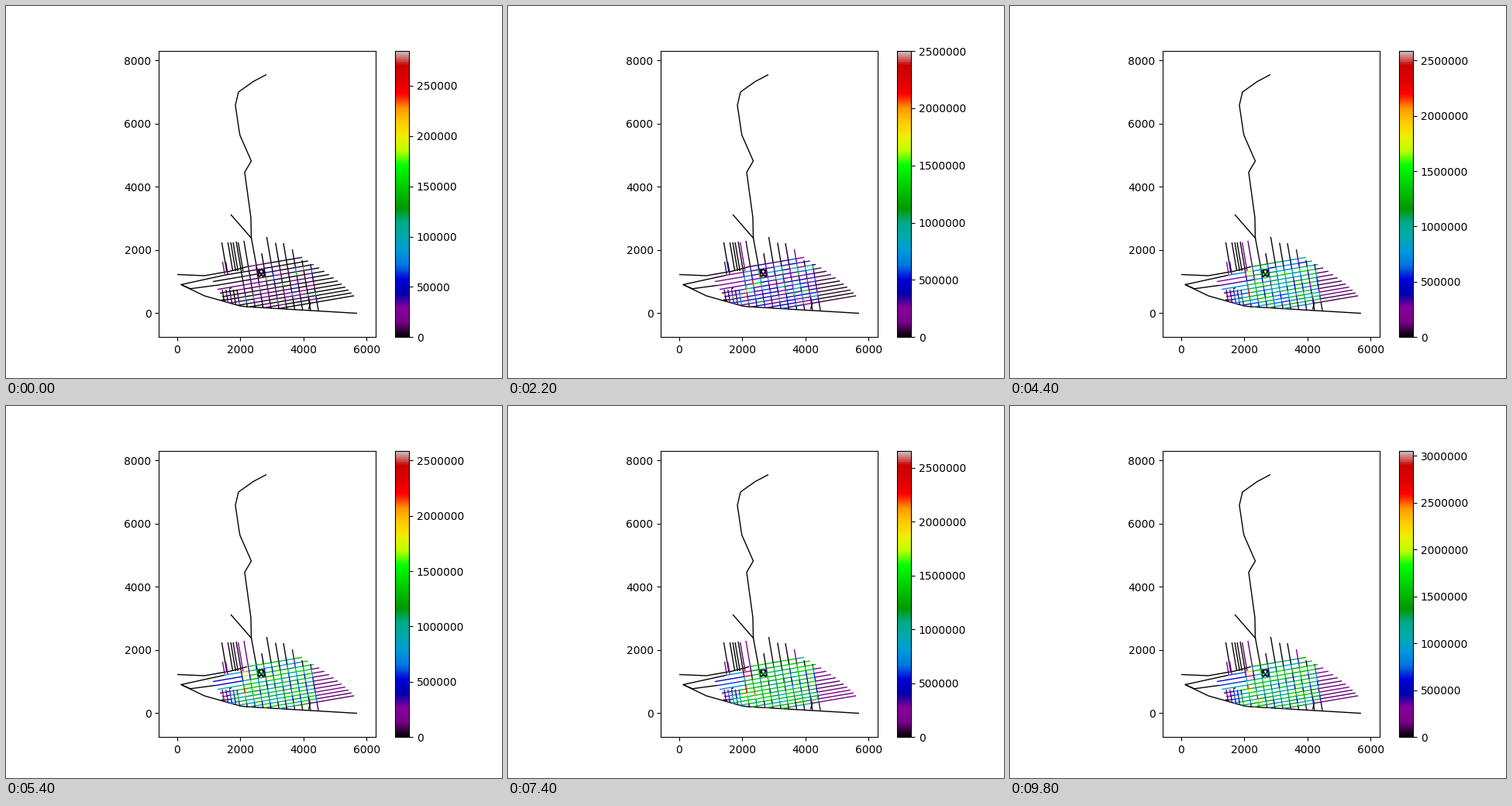
These frames come from a looping animation (640 px wide and 480 px high, 10000 ms). A matplotlib script:

```python
import numpy as np
import matplotlib.pyplot as plt
from matplotlib.animation import FuncAnimation
from matplotlib.collections import LineCollection

FRAMES, STEP_MS = 50, 200
SLOPE = 0.17
rng = np.random.default_rng(12)


def metres(pts):
    """Map plan units (y down) to metres."""
    x, y = np.asarray(pts, float).T
    return np.column_stack([(x - 220.6) / 0.0408, (396.4 - y) / 0.0408])


def shore(x):
    return np.interp(x, [256, 302, 310, 453], [374, 387, 388, 396.5])


def row_point(c, x):
    return x, c - SLOPE * (x - 340)


def col_point(k, y):
    return k + SLOPE * (y - 360), y


def crossing(c, k):
    y = (c - SLOPE * (k - 340 - SLOPE * 360)) / (1 + SLOPE ** 2)
    return col_point(k, y)


def pieces(a, b, cuts):
    stops = [a] + sorted(s for s in cuts if a + 1 < s < b - 1) + [b]
    return zip(stops[:-1], stops[1:])


# Roads that stay empty
t = np.linspace(0, 2 * np.pi, 40)
knot = np.column_stack([329.5 + 4 * np.sin(3 * t), 344.5 + 4.5 * np.sin(4 * t + 0.6)])
roads = [
    [(336, 88.5), (319, 97.5), (300, 111), (296, 128), (301, 162), (302, 167),
     (316.5, 200), (308, 214.5), (316, 273), (316.5, 299), (325, 345)],
    [(290, 269), (317, 300)],
    [(221, 346.5), (256, 348), (290, 342), (311, 336.4)],
    [(282, 347.3), (226, 359.5), (256, 374), (302, 387), (310, 388), (453, 396.5)],
    [(226, 359.5), (238, 364.8), (270, 360.5)],
    [(278, 379), (284, 379.5)],
    [(288, 365), (291, 363.5)],
    [(389, 370), (392.5, 384), (390.5, 391.5)],
    knot,
]

# Cross streets: offset at x=340, west end, east end
rows = []
for i in range(13):
    c = 331.5 + 6 * i - 0.077 * i ** 2
    west = 311 - 29 * i if i < 2 else 261 + 3 * i
    while row_point(c, west)[1] > shore(west):
        west += 0.5
    rows.append((c, west, 382 + 8 * i - 0.2 * i ** 2))

# Avenues: offset at y=360, top end, bottom end
AVENUES = 306.6 + 10.1 * np.arange(10)
tops = [304, 303, 336, 319, 298, 305.5, 306, 314, 328, 333]
cols = [(k, top, shore(k + 5) + 0.5) for k, top in zip(AVENUES, tops)]
cols += [(k, 305, 342) for k in (287.8, 295.7, 299.4, 302.4, 309)]
cols += [(k, 330, 346) for k in (284.6, 288.6)]
cols += [(k, 366, shore(k + 4) + 0.5) for k in np.linspace(278, 297, 5)]

segments, upright, offsets = [], [], []


def add_street(point, offset, a, b, cuts, up):
    for lo, hi in pieces(a, b, cuts):
        segments.append([point(offset, lo), point(offset, hi)])
        upright.append(up)
        offsets.append(offset)


for c, west, east in rows:
    cuts = [crossing(c, k)[0] for k, top, end in cols
            if top - 1 < crossing(c, k)[1] < end]
    add_street(row_point, c, west, east, cuts, False)
for k, top, end in cols:
    cuts = [crossing(c, k)[1] for c, west, east in rows
            if west - 1 < crossing(c, k)[0] < east + 1]
    add_street(col_point, k, top, end, cuts, True)

upright, offsets = np.array(upright), np.array(offsets)
mx, my = np.mean(segments, axis=1).T
count = len(segments)

# Traffic thins out towards the edges of the grid
weight = np.clip((mx - 276) / 26, 0, 1)
weight[~upright & (mx > 396)] = 0.1
weight[upright & (mx > 385)] = 0.7
weight[upright & (my > 386)] = 0.1
stub = upright & (my < 334)
weight[stub] = rng.choice([0.02, 0.15], stub.sum(), p=[0.7, 0.3])

bias = rng.normal(0, 0.75, count)
phase = rng.uniform(0, 2 * np.pi, count)
speed = rng.uniform(0.1, 0.4, count)


def bump(v, centre, width):
    return np.exp(-((v - centre) / width) ** 2)


def peak_flow(n):
    return np.interp(n, [0, 5, 11, 22, 31, 43, 49],
                     [285e3, 2.45e6, 2.503e6, 2.59e6, 2.59e6, 2.728e6, 3.057e6])


def flow(n):
    """Flow on every street piece at step n."""
    start = min(1, (n + 0.15) / 5)
    s = min(1, n / 36)
    row_flow = 0.12e6 * start + 1.25e6 * s * s * (3 - 2 * s)
    col_flow = start * (0.3e6 + 0.013e6 * n)
    spread = np.where(upright, 0.5, 0.22) + 1.1 * np.exp(-n / 9)
    wave = bias + 0.8 * np.sin(speed * n + phase)
    top = peak_flow(n)
    value = np.where(upright, col_flow, row_flow) * weight * np.exp(spread * wave)
    value = np.minimum(value, 0.53 * top)

    inside = upright & (my > 338)
    jam = 0.75 * bump(my, 377 - 0.3 * n, 6) * (inside & (offsets == AVENUES[0]))
    jam += 0.5 * bump(my, 353 + 0.45 * n, 7) * (inside & (offsets == AVENUES[1]))
    jam += 0.4 * s * bump(mx, 307, 7) * (~upright & (my < 350))
    return np.clip(value + start * jam * top, 0, 0.93 * top)


fig, ax = plt.subplots(figsize=(6.4, 4.8), dpi=100)
ax.set_aspect("equal")
ax.set_xlim(-571, 6280)
ax.set_ylim(-755, 8304)

net = LineCollection([metres(s) for s in roads + segments],
                     cmap="nipy_spectral", linewidths=1.0)
net.set_array(np.zeros(len(roads) + count))
net.set_clim(0, peak_flow(0))
ax.add_collection(net, autolim=False)
fig.colorbar(net, ax=ax, format="%d")


def draw(n):
    net.set_clim(0, peak_flow(n))
    net.set_array(np.concatenate([np.zeros(len(roads)), flow(n)]))
    return [net]


anim = FuncAnimation(fig, draw, frames=FRAMES, interval=STEP_MS,
                     repeat=True, repeat_delay=0, blit=False)
plt.show()
```
